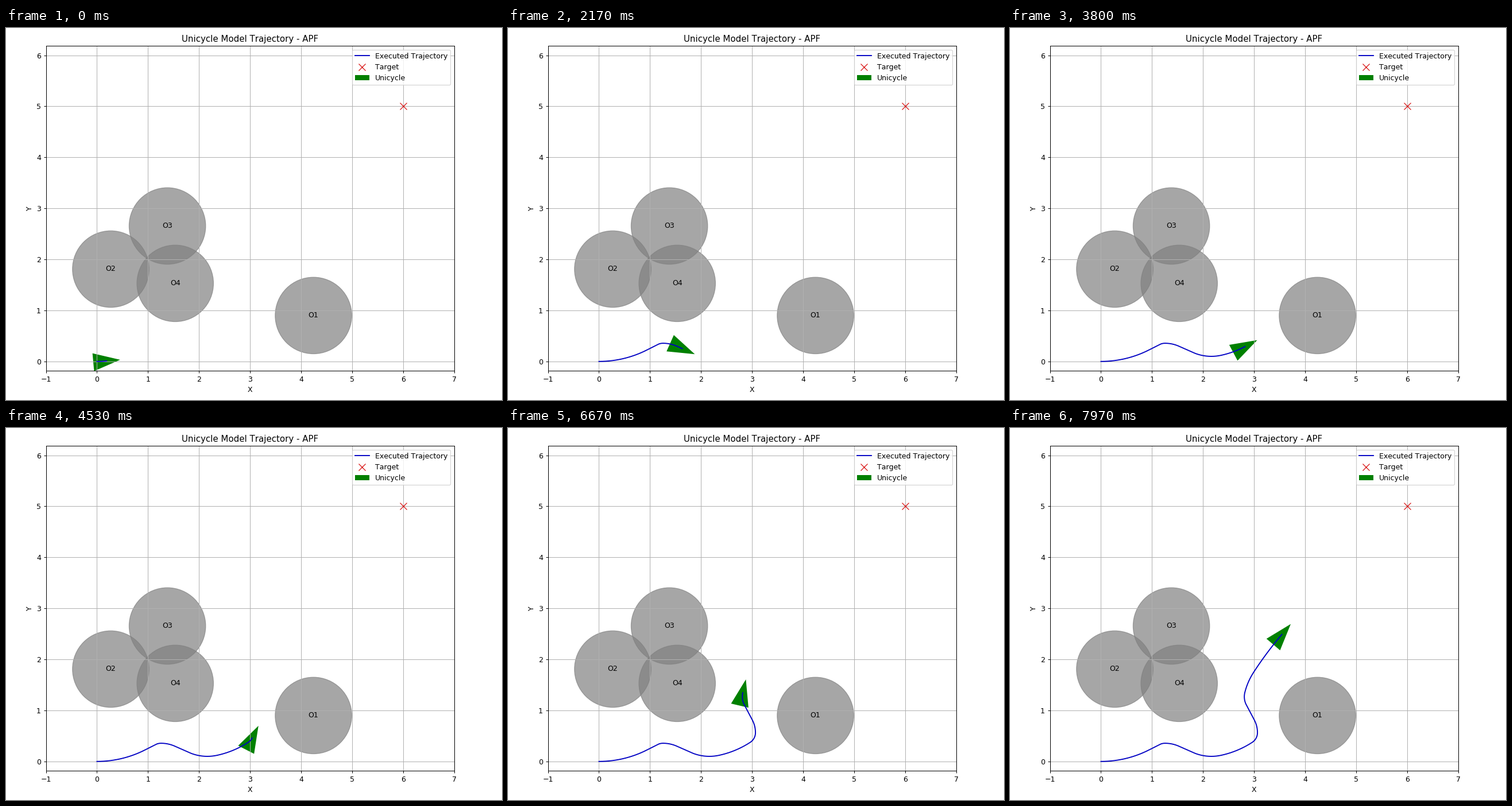
Animation of 864x648 px, one loop 8 s. Source, as a matplotlib script:

```python
import numpy as np
import matplotlib.pyplot as plt
from matplotlib.animation import FuncAnimation

W, H, DPI = 864, 648, 90
LOOP, STEP = 8000, 32

# The drive is a chain of circular arcs: length, turn in degrees.
ARCS = [(0.98, 27), (0.23, 0), (0.11, -27), (0.28, -24), (0.30, 0),
        (0.56, 36), (0.67, 21), (0.225, 57), (0.26, 28), (0.33, 0),
        (0.255, -42), (0.43, -19), (1.0, -8)]
MS_PER_UNIT = 642
MS_PER_RADIAN = 914
HEAD_START = 0.187

OBSTACLES = [(4.243, 0.90), (0.27, 1.81), (1.38, 2.655), (1.533, 1.53)]
RADIUS = 0.75
BODY = np.array([(0.268, 0), (-0.26, 0.175), (-0.26, -0.175)])


def running(parts):
    return np.concatenate([[0], np.cumsum(parts)])


def drive(samples=60):
    """Points, headings and clock; turning costs time just as distance does."""
    arcs = np.repeat(ARCS, samples, axis=0) / samples
    ds, turn = arcs[:, 0], np.radians(arcs[:, 1])
    heading = running(turn)
    mid = heading[:-1] + turn / 2
    points = np.column_stack([running(ds * np.cos(mid)),
                              running(ds * np.sin(mid))])
    clock = running(MS_PER_UNIT * ds + MS_PER_RADIAN * np.abs(turn))
    clock -= np.interp(HEAD_START, running(ds), clock)
    return points, heading, clock


points, heading, clock = drive()

plt.rcParams["text.kerning_factor"] = 6
fig = plt.figure(figsize=(W / DPI, H / DPI), dpi=DPI, facecolor="white")
box_w, box_h = 711, 565.6
ax = fig.add_axes([69.6 / W, 51 / H, box_w / W, box_h / H])
half = 4 * box_h / box_w
ax.set_xlim(-1, 7)
ax.set_ylim(3 - half, 3 + half)
ax.set_title("Unicycle Model Trajectory - APF")
ax.set_xlabel("X")
ax.set_ylabel("Y")
ax.grid(True)

for n, (cx, cy) in enumerate(OBSTACLES, 1):
    ax.add_patch(plt.Circle((cx, cy), RADIUS, color="gray", alpha=0.7))
    ax.text(cx, cy, f"O{n}", ha="center", va="center")

trail, = ax.plot([], [], color="#0000c4", label="Executed Trajectory")
ax.plot([6], [5], "x", color="#d81414", markersize=10, label="Target")
body = plt.Polygon(BODY, closed=True, fc="green", lw=0, label="Unicycle")
ax.add_patch(body)
ax.legend(loc="upper right")


def update(frame):
    t = frame * STEP
    x, y, a = (np.interp(t, clock, v) for v in (*points.T, heading))
    rot = np.array([[np.cos(a), np.sin(a)], [-np.sin(a), np.cos(a)]])
    body.set_xy((x, y) + BODY @ rot)
    trail.set_data(*np.vstack([points[clock < t], (x, y)]).T)
    return trail, body


def reset():
    return update(0)


anim = FuncAnimation(fig, update, frames=LOOP // STEP, init_func=reset,
                     interval=STEP, repeat=True, repeat_delay=0, blit=False)
plt.show()
```
